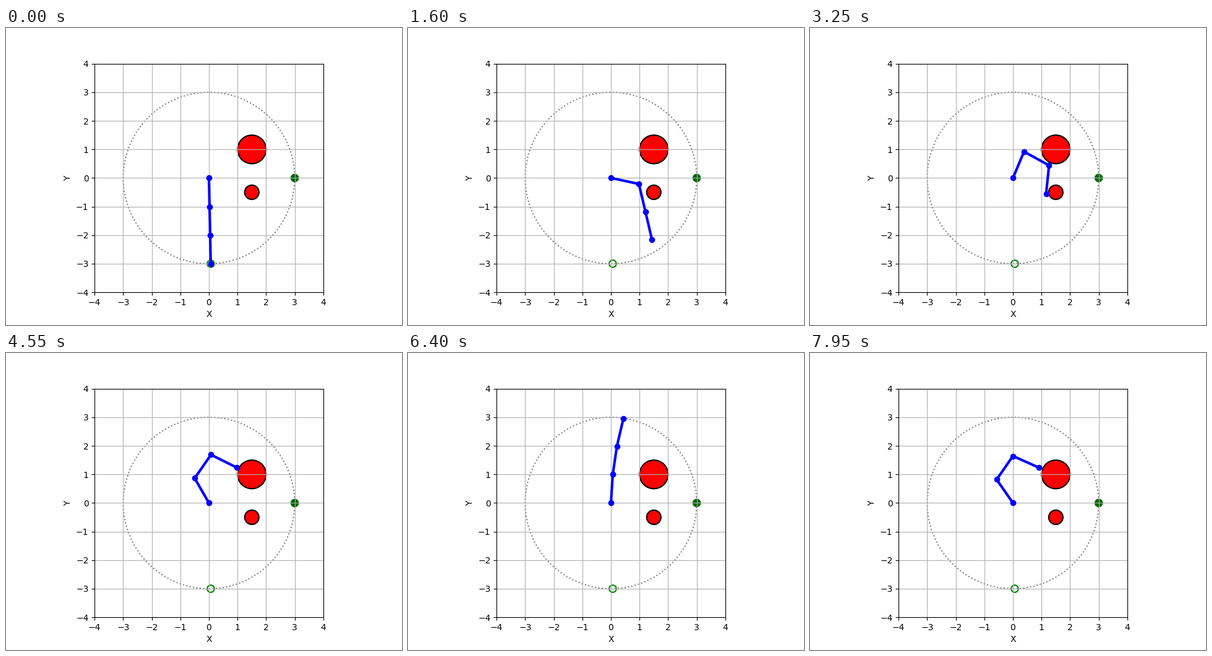
Write a matplotlib script that moves like this. It is 640 by 480 pixels and loops after 8000 ms.

```python
import numpy as np
import matplotlib.pyplot as plt
from matplotlib.animation import FuncAnimation

INTERVAL = 50
STEP = 2 * np.pi / 150  # joint angles move on a grid of this size

# key poses of the three relative joint angles, in grid steps
POSES = [(-37, 0, 0), (-32, 0, 0), (-5, -27, 0), (23, -41, -28),
         (28, -40, -28), (38, -43, -28), (50, -27, -34), (40, -16, -23),
         (38, 0, 0), (38, 0, 0), (29, -6, -10), (52, -29, -33)]


def plan_route(poses):
    """Step every joint by at most one grid cell per frame; a repeated pose rests."""
    route = [np.array(poses[0])]
    for goal in poses[1:]:
        count = max(1, np.abs(goal - route[-1]).max())
        for _ in range(count):
            route.append(route[-1] + np.sign(goal - route[-1]))
    return route


def arm_points(joints):
    """Base, elbows and tip of the arm with unit links."""
    heading = np.cumsum(joints) * STEP
    x = np.append(0, np.cumsum(np.cos(heading)))
    y = np.append(0, np.cumsum(np.sin(heading)))
    return x, y


route = plan_route(POSES)

fig, ax = plt.subplots(figsize=(6.4, 4.8), dpi=100)
ax.set_aspect("equal")
ax.set(xlim=(-4, 4), ylim=(-4, 4), xlabel="X", ylabel="Y")
ax.set_xticks(range(-4, 5))
ax.set_yticks(range(-4, 5))
ax.grid(True)


def add_circle(center, radius, face, edge, style="-"):
    ax.add_patch(plt.Circle(center, radius, fc=face, ec=edge, ls=style, lw=1.5))


start_x, start_y = arm_points(route[0])
add_circle((0, 0), 3, "none", "gray", ":")
add_circle((1.5, 1), 0.5, "red", "black")
add_circle((1.5, -0.5), 0.25, "red", "black")
add_circle((start_x[-1], start_y[-1]), 0.125, "none", "green")
add_circle((3, 0), 0.125, "darkgreen", "darkgreen")

arm, = ax.plot([], [], "o-", color="blue", lw=3, markersize=6)


def update(frame):
    arm.set_data(*arm_points(route[frame]))
    return arm,


anim = FuncAnimation(fig, update, frames=len(route), interval=INTERVAL,
                     repeat=True, repeat_delay=0)
plt.show()
```
